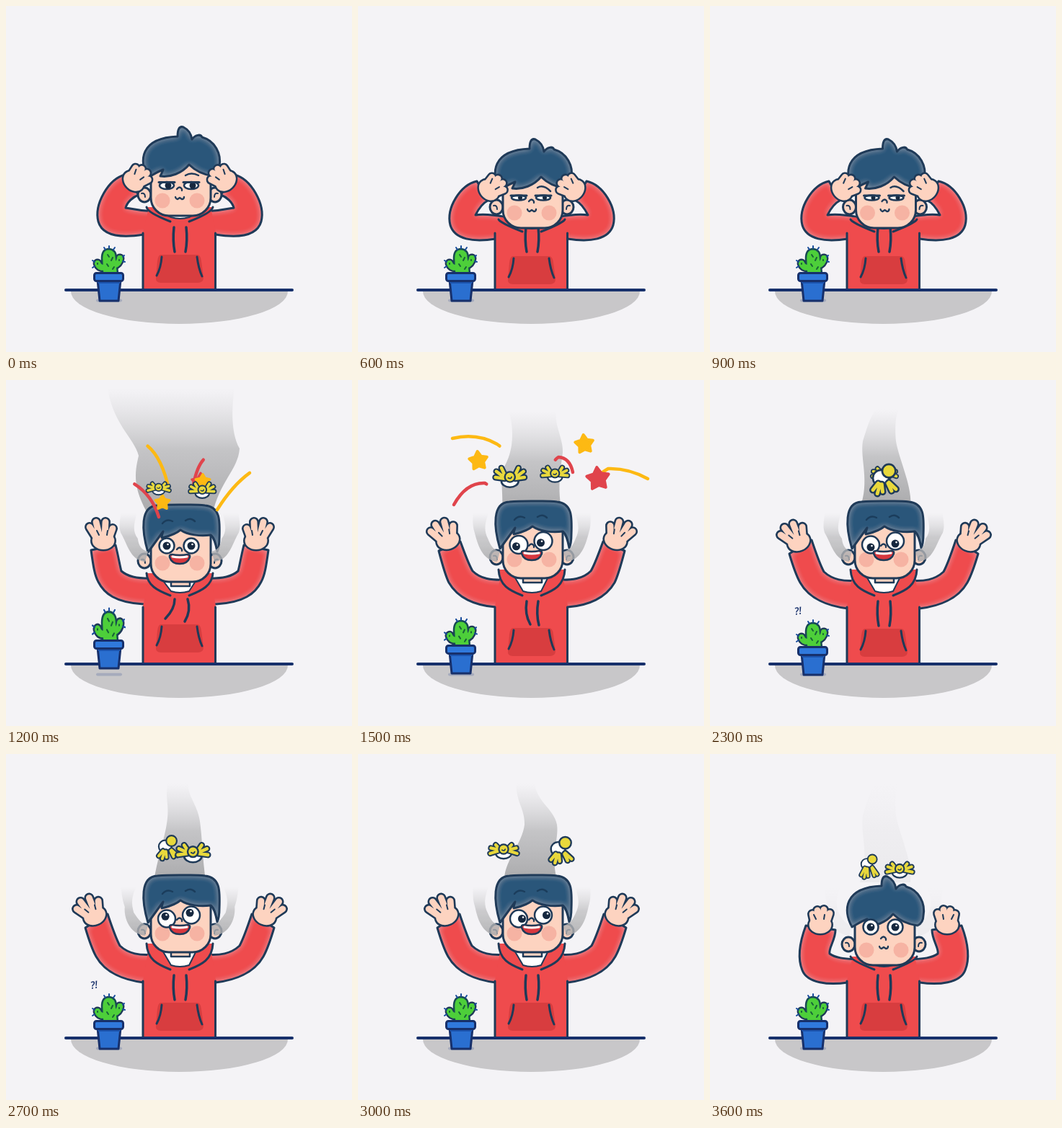
An HTML page for the animation above (3.7 s loop, 480 by 480 pixels).

```html
<!DOCTYPE html>
<html lang="en">
<head>
<meta charset="utf-8">
<title>Overheated</title>
<style>
html, body { margin: 0; width: 100%; height: 100%; overflow: hidden; background: #f4f3f6; }
svg { display: block; width: 100vw; height: 100vh; }
</style>
</head>
<body>
<svg viewBox="0 0 480 480" stroke-linecap="round" stroke-linejoin="round">
  <defs>
    <linearGradient id="fade" x1="0" y1="1" x2="0" y2="0">
      <stop offset="0" stop-color="#a9a9ab"/>
      <stop offset=".5" stop-color="#bebec0" stop-opacity=".88"/>
      <stop offset=".96" stop-color="#d0d0d2" stop-opacity="0"/>
    </linearGradient>
    <filter id="glow">
      <feGaussianBlur in="SourceAlpha" stdDeviation="4.500" result="soft"/>
      <feFlood flood-color="#cfe2ee" flood-opacity=".42"/>
      <feComposite in2="soft" operator="out"/>
      <feComposite in2="SourceAlpha" operator="in" result="rim"/>
      <feMerge><feMergeNode in="SourceGraphic"/><feMergeNode in="rim"/></feMerge>
    </filter>
  </defs>
  <g id="stage"></g>
</svg>
<script>
const LOOP = 3700, STEP = 100;
const INK = '#1f3a58', NAVY = '#17306b', RED = '#ef4b4d', SKIN = '#fdd3c0', HAIR = '#29577a',
      GOLD = '#fdb913', CRIMSON = '#e0444c', BIRD = '#e8d83c';
const NUM = /-?[\d.]+/g;
const clamp = x => Math.max(0, Math.min(1, x));

// Blend two strings that share a structure, number by number.
function mix(a, b, u) {
  const to = b.match(NUM);
  let i = 0;
  return a.replace(NUM, x => +(+x + (to[i++] - x) * u).toFixed(2));
}

function at(keys, t) {
  const i = keys.findIndex(k => k[0] > t);
  if (i === 0) return keys[0][1];
  if (i < 0) return keys[keys.length - 1][1];
  const [t0, a] = keys[i - 1], [t1, b] = keys[i], u = (t - t0) / (t1 - t0);
  return mix(a, b, u * u * (3 - 2 * u));
}

const path = (d, fill, stroke = INK, w = 3, more = '') =>
  `<path d="${d}" fill="${fill}" stroke="${stroke}" stroke-width="${w}" ${more}/>`;
const line = (d, stroke = INK, w = 3, more = '') => path(d, 'none', stroke, w, more);
const lit = (d, fill) => path(d, fill, 'none', 0, 'filter="url(#glow)"') + line(d);
const oval = (x, y, rx, ry, fill, w = 0, stroke = INK) =>
  `<ellipse cx="${x}" cy="${y}" rx="${rx}" ry="${ry}" fill="${fill}" stroke="${stroke}" stroke-width="${w}"/>`;
const group = (move, body, more = '') => `<g transform="${move}" ${more}>${body}</g>`;
const both = body => body + group('translate(482) scale(-1 1)', body);
const tube = (d, fill, w, rim = 4) => line(d, INK, w + rim) + line(d, fill, w);

// Pose: chin, pop, pocket shift, hand x, y, turn, eye rx, ry, eye offset | arm | hoodie cords
const CORDS = 'M233,307Q231,325 234,341M250,307Q252,325 249,341';
const pose = (nums, arm, cords = CORDS) => [nums, arm, cords].join('|');
const think = pose('291 0 0 172 248 45 10 5 -42',
  'M206,317L191,317C160,322 134,320 128,299C122,275 142,240 165,234L184,262C176,265 168,272 166,280C176,282 185,284 206,285');
const strain = pose('308 0 2 176 260 50 10 3.5 -42',
  'M206,323L191,323C160,328 134,324 128,304C122,280 142,248 165,243L180,270C172,274 166,284 163,290C176,288 190,290 206,293');
const burst = pose('280 1 -6 135 230 0 10.5 10.5 -50',
  'M206,311L191,311C152,309 136,296 128,280C123,271 121,258 118,236L152,229C156,245 158,258 160,265C168,272 180,276 206,275');
const sway = pose('275 1 -1 127 229 -18 12.5 12.5 -49',
  'M206,315L191,315C162,313 138,302 126,281C121,271 117,256 112,237L142,224C148,240 153,255 159,265C170,276 185,278 206,277',
  'M234,307Q231,325 239,339M250,307Q247,325 251,340');
const dizzy = pose('275 1 0 126 231 -24 12 12 -49',
  'M206,317L191,317C165,314 138,304 125,281C120,272 115,258 110,241L141,222C147,240 152,255 158,266C170,277 185,280 206,278');
const settle = pose('293 0 0 153 244 0 10.5 10.5 -53',
  'M206,317L191,317C165,321 135,318 128,300C121,283 124,262 133,238L174,244C174,258 164,270 166,277C175,284 190,284 206,285');
const thrown = burst.replace(CORDS, 'M234,304Q234,318 221,331M252,304Q257,320 248,335');
const poses = [[0, think], [500, strain], [900, strain], [1100, thrown], [1200, thrown], [1400, sway],
  [1500, sway], [1700, dizzy], [3200, dizzy], [3500, settle], [3600, settle], [3700, think]];

// Both drawn for a chin at y = 291
const hairCalm = 'M197,238C184,215 186,183 238,181C238,172 240,166 246,168C254,172 257,178 258,185C262,179 270,177 272,182C290,187 299,205 296,222C296,230 292,234 288,236C272,234 262,228 254,220C244,232 228,238 214,236C216,232 217,230 218,227C210,230 204,234 197,238Z';
const hairWild = 'M197,250C188,220 186,186 210,185C222,184 232,184 240,184C246,184 252,184 256,184C262,184 268,184 276,185C297,187 297,205 296,230C296,238 295,245 293,249C291,238 289,230 284,226C270,228 252,226 242,219C234,226 224,228 216,230C216,227 217,224 218,221C207,228 202,238 197,250Z';
const fist = 'M-8,-8L-11,-22M-3,-8L-4,-27M3,-8L5,-28M8,-8L13,-23';
const palm = 'M-9,-10L-19,-26M-5,-12L-10,-33M2,-12L3,-33M8,-10L13,-24';

const plumeA = 'M208,178C222,140 208,110 212,85C220,60 222,50 235,35L265,35C258,45 256,60 258,85C262,110 282,150 278,178Z';
const plumeB = 'M203,178C201,150 228,125 231,98C232,75 217,65 220,35L245,35C244,65 272,75 276,98C279,120 266,140 277,178Z';
const plumes = [
  [1200, 'M198,188C176,150 178,130 184,105C178,80 146,60 140,4L318,4C314,30 310,70 324,95C322,125 296,140 286,188Z'],
  [1500, 'M200,188C202,150 196,140 203,120C215,100 218,70 208,38L276,38C270,60 285,80 284,100C282,120 275,150 284,188Z'],
  [1900, plumeB], [2300, plumeA], [3000, plumeB], [3600, plumeA]];
const haze = [[1000, '0'], [1100, '1'], [3100, '1'], [3600, '.12'], [3700, '0']];
const hop = [[1000, '0 1'], [1200, '-9 1.2'], [1300, '-8 1.12'], [1600, '0 1']];

const plume = t => path(at(plumes, t), 'url(#fade)', 'none', 0, `opacity="${at(haze, t)}"`);

function earSmoke(t) {
  const w = 3 * Math.sin(t / 160);
  const puff = path(`M193,252C172,250 ${166 + w},228 ${162 - w},212C${158 - w},200 160,190 159,182H182C${176 + w},198 174,208 ${180 + w},220C184,230 188,236 197,238Z`, 'url(#fade)', 'none');
  return group('', both(puff), `opacity="${at(haze, t) * .85}"`);
}

function torso(c, shift, cords) {
  const top = 276 + (c - 276) * .55, h = Math.max(299, c + 5);
  const hood = `M195,${c - 12}C196,${h - 14} 210,${h - 7} 228,${h}`;
  const pocket = path('M215,345H265Q270,345 271,354L274,377Q274,384 266,384H215Q207,384 208,376L210,354Q211,345 215,345Z', '#d83d3f', 'none')
    + line('M216,348Q215,363 209,374M265,348Q267,364 272,375');
  return path(`M190,393V314L197,${top}H285L291,314V393Z`, RED, 'none')
    + line('M190,392V315M290.5,392V315')
    + path(`${hood}H254C272,${h - 7} 286,${h - 14} 287,${c - 12}Z`, RED, 'none')
    + path(`M216,${c - 4}H265L254,${h - 6}Q241,${h - 2} 229,${h - 6}Z`, '#fff', INK, 2)
    + both(line(hood))
    + group(`translate(0 ${shift})`, pocket) + line(cords, INK, 3.5);
}

function eye(x, y, rx, ry, dx, dy) {
  const r = Math.min(5.5, ry - .5);
  return oval(x, y, rx, ry, '#fff', 2.5) + oval(x + dx, y + dy, r, r, '#16283f')
    + (ry < 7 ? line(`M${x - 11},${y - ry + .5}h22`, INK, 3) : oval(x + dx + 1.5, y + dy - 2, 1.3, 1.3, '#fff'));
}

function head(c, pop, rx, ry, eyeY, t) {
  const wild = pop > .5, y = c + eyeY, a = orbit(t), look = t > 1250 && t < 3250 ? 4.5 : 0;
  const dx = look ? look * Math.cos(a) : ry < 7 ? 2 : 0, dy = look * Math.sin(a) * .8;
  const tilt = look ? 2.5 : 0, cheek = c - 21 - 5 * pop, m = c - 38;
  const mouth = wild
    ? path(`M230,${m}Q241,${m + 2} 252,${m}Q256,${m} 255,${m + 4}Q252,${m + 13} 241,${m + 13}Q230,${m + 13} 227,${m + 4}Q226,${m} 230,${m}Z`, '#d8373e', INK, 2.5)
      + line(`M231,${m + 3}Q241,${m + 5} 251,${m + 3}`, '#fff', 3)
    : line(`M235,${c - 26}q1,3 3,3l3,-2l3,2q3,0 3,-3`, INK, 2.3);
  const brow = wild
    ? line(`M217,${c - 81}q6,-7 14,-3M249,${c - 85}q7,-5 13,1`, '#1b3d5c', 2.5)
    : ry < 7 ? line(`M249,${c - 56}q8,-5 18,${ry < 4.5 ? 5 : 0}`, INK, 2.5) : '';
  return (pop > 0 ? path(`M229,${c - 4}V${c + 6 * pop}H255V${c - 4}`, SKIN, INK, 2.5) : '')
    + both(oval(192, c - 29, 9, 10, SKIN, 3) + line(`M188,${c - 31}q5,-1 5,5`, INK, 2))
    + `<rect x="201" y="${c - 88}" width="83" height="88" rx="25" fill="${SKIN}" stroke="${INK}" stroke-width="3"/>`
    + oval(217, cheek, 10.5, 10.5, '#f6b3a3') + oval(265, cheek, 10.5, 10.5, '#f6b3a3')
    + group(`translate(0 ${c - 291})`, lit(mix(hairCalm, hairWild, pop), HAIR))
    + brow + eye(223, y + tilt, rx, ry, dx, dy) + eye(257, y - tilt, rx, ry, dx, dy)
    + line(`M237,${c - 37 - 8 * pop}q4,-5 7,0v2`, INK, 2.3) + mouth;
}

function hand(x, y, turn, open) {
  const d = mix(fist, palm, open);
  return group(`translate(${x} ${y}) rotate(${turn})`,
    line(d, INK, 14) + oval(0, -7, 18, 14.5, INK) + line(d, SKIN, 8.8)
    + oval(0, -7, 15.4, 12, SKIN) + line('M-6,-15l-3,-6M5,-15l1,-6', INK, 2));
}

function cactus(t) {
  const [dy, stretch] = at(hop, t).split(' ').map(Number);
  const arms = 'M136,363Q129,363 127,357M148,361Q157,358 158,350';
  const plant = tube(arms, '#4dcf3a', 8, 5)
    + path('M134,371L133,350Q133,337 143,337Q153,338 153,350L155,371Z', '#4dcf3a', '#174a52', 2.5)
    + line(arms, '#4dcf3a', 8)
    + line('M138,338l-2,-3M143,336v-3M149,338l2,-3M123,355l-3,-2M123,361l-3,2M162,348l2,-2M162,354l3,1', '#174a9b', 2)
    + line('M141,345l2,3M148,349l-2,4M140,358l2,3M150,362l-2,3M127,357v1M157,352v1', '#176238', 2);
  const pot = path('M127,380L130,409H156L159,380Z', '#2a6fd0', NAVY)
    + line('M129,383H157', '#1c54ae', 4)
    + `<rect x="122.500" y="370.500" width="40" height="11" rx="3" fill="#3079dc" stroke="${NAVY}" stroke-width="3"/>`;
  const shout = t >= 2000 && t < 2800
    ? `<text transform="translate(118 326) rotate(-10)" font-family="'Open Sans', sans-serif" font-size="14" font-style="italic" font-weight="600" fill="${NAVY}">?!</text>` : '';
  return line('M127,408.500H159', '#a6abbc', 4)
    + group(`translate(0 ${dy})`, group(`translate(0 ${370 * (1 - stretch)}) scale(1 ${stretch})`, plant) + pot) + shout;
}

const orbit = t => Math.PI * (.5 + (t - 2300) / 466.5);

function bird(t, k) {
  const a = orbit(t) + k * Math.PI, rise = clamp((t - 1100) / 350), drop = clamp((t - 3200) / 400);
  const x = 242 + (31 + 9 * rise - 6 * drop) * Math.cos(a);
  const y = 132 + 26 * (1 - rise) + 24 * drop + 4 * Math.sin(a);
  const size = (.85 + .25 * rise - .15 * drop) * (1 + .12 * Math.sin(a));
  const flap = 3 * Math.sin(t / 55 + k);
  const gliding = !k && t > 1800;
  const body = gliding
    ? oval(-4, 0, 9, 9, '#fff', 2.2)
      + tube(`M-7,6L-13,${16 + flap}M-5,7L-8,${20 + flap}M-3,7L-2,${18 + flap}M5,5L13,${15 + flap}M4,6L8,${17 + flap}`, BIRD, 4)
      + oval(5, -8, 7.5, 7.5, BIRD, 2.2)
    : oval(0, 5, 10, 7, '#fff', 2.2)
      + tube(`M-6,2L-17,${3 - flap}M-6,1L-16,${-4 - flap}M-5,0L-10,${-8 - flap}M6,2L17,${3 - flap}M6,1L16,${-4 - flap}M5,0L10,${-8 - flap}`, BIRD, 3.8, 3.6)
      + oval(0, 0, 6, 6, BIRD, 2) + line('M-2,1q3,2 4,-1', INK, 1.5);
  return [Math.sin(a), group(`translate(${x} ${y}) scale(${size})`, body)];
}

const birds = t => t < 1100 ? '' :
  [bird(t, 0), bird(t, 1)].sort((p, q) => p[0] - q[0]).map(b => b[1]).join('');

const streaks = [
  ['M226,152C218,115 205,97 193,89Q165,73 131,81', GOLD],
  ['M212,190Q202,158 176,143Q150,142 133,173', CRIMSON],
  ['M260,145Q266,115 278,107Q294,108 298,128', CRIMSON],
  ['M293,180Q318,140 347,123Q375,122 402,137', GOLD]];
// Start, velocity and acceleration in x and y, then size and colour
const stars = [
  [270, 60, 3, 142, -33, 28, 16, CRIMSON],
  [217, -40.7, -9.3, 170, -86, 28, 13, GOLD],
  [273, 41, 0, 141, -80, 28, 13, GOLD]];

function starShape(r) {
  const points = Array.from({ length: 10 }, (_, i) => {
    const a = i * Math.PI / 5 - Math.PI / 2, q = i % 2 ? r * .56 : r;
    return `${q * Math.cos(a)},${q * Math.sin(a)}`;
  });
  return `M${points.join('L')}Z`;
}

function sparks(t) {
  if (t < 1100 || t > 2000) return '';
  const front = (t - 900) / 600, tail = clamp(front - .5), len = clamp(front) - tail, s = (t - 1200) / 300;
  const trails = len <= 0 ? '' : streaks.map(([d, c]) =>
    line(d, c, 4.5, `pathLength="1" stroke-dasharray="${len} 3" stroke-dashoffset="${-tail}"`)).join('');
  const flying = s < 0 ? '' : stars.map(([x, vx, ax, y, vy, ay, r, c]) =>
    group(`translate(${x + vx * s + ax * s * s} ${y + vy * s + ay * s * s}) rotate(${s * 66}) scale(${Math.min(1, .8 + .2 * s)})`,
      path(starShape(r), c, c, 4), `opacity="${clamp((2100 - t) / 300)}"`)).join('');
  return trails + flying;
}

function scene(t) {
  const [nums, arm, cords] = at(poses, t).split('|');
  const [c, pop, shift, hx, hy, turn, rx, ry, eyeY] = nums.split(' ').map(Number);
  const shake = t > 600 && t < 1000 ? (t / STEP % 2 ? 1.5 : -1.5) : 0;
  return path('M90,396A150.500,45 0 0 0 391,396Z', '#c8c7c9', 'none')
    + plume(t)
    + both(lit(arm, RED))
    + torso(c, shift, cords)
    + group(`translate(${shake})`, head(c, pop, rx, ry, eyeY, t) + earSmoke(t) + both(hand(hx, hy, turn, pop)))
    + sparks(t) + birds(t)
    + line('M83,394H397', NAVY, 4)
    + cactus(t);
}

const stage = document.getElementById('stage');
let shown = -1;
function draw() {
  const t = Math.floor(performance.now() % LOOP / STEP) * STEP;
  if (t !== shown) stage.innerHTML = scene(shown = t);
  requestAnimationFrame(draw);
}
draw();
</script>
</body>
</html>
```
